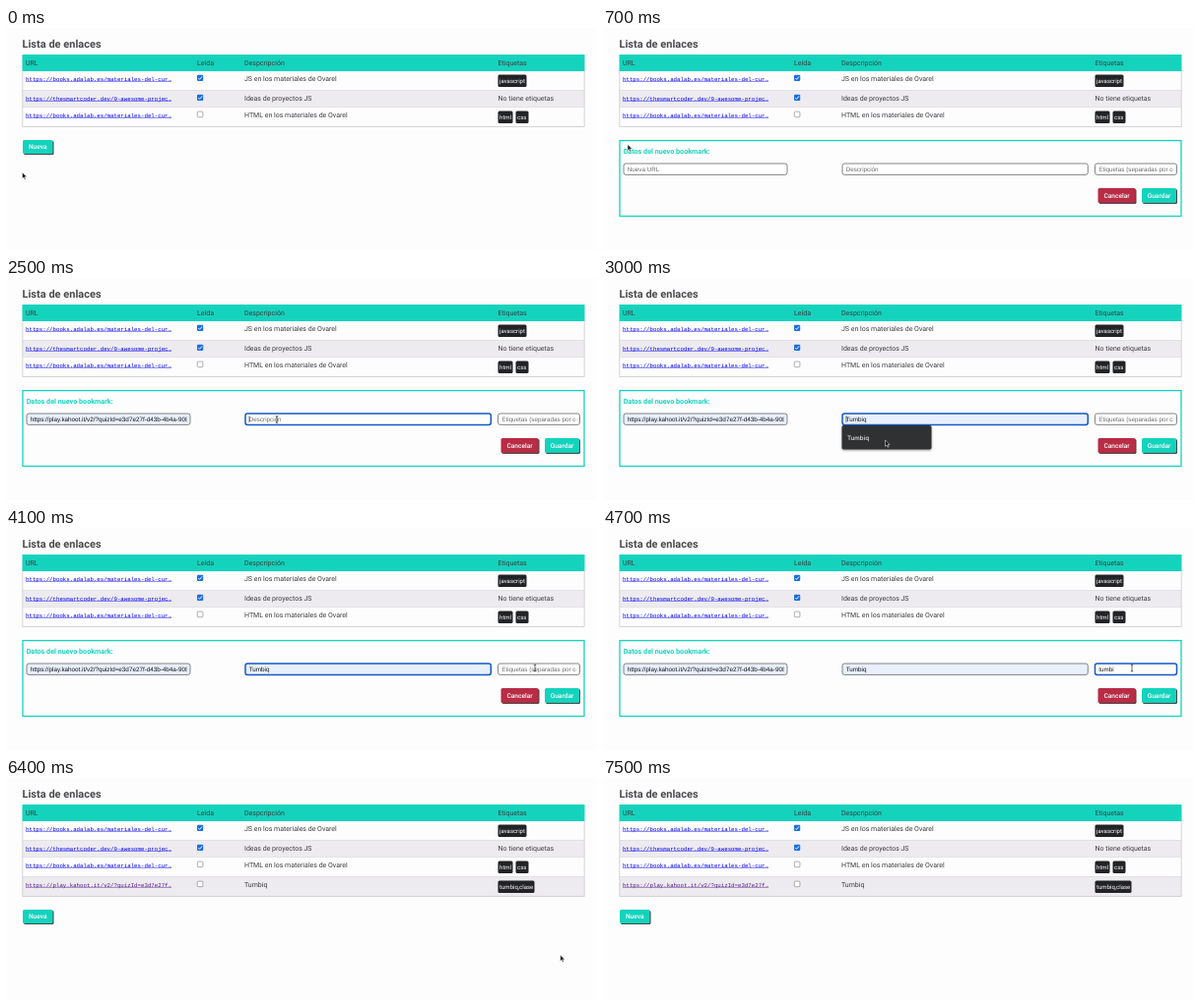
Recreate the animation shown at these times as an HTML page. Size 600 px wide and 226 px high, loop 7700 ms.

```html
<!DOCTYPE html>
<html lang="es">
<head>
<meta charset="utf-8">
<title>Lista de enlaces</title>
<style>
  html, body { margin: 0; width: 100%; height: 100%; overflow: hidden; background: #fefdfe; }
  #stage { display: block; width: 600px; height: 226px; }
  text { font: 7px Roboto, sans-serif; fill: #3c3c3f; text-rendering: geometricPrecision; white-space: pre; }
  .heading { font-size: 11px; font-weight: 700; fill: #4a4a4c; }
  .legend { font-size: 7.2px; font-weight: 700; fill: #14d3bd; }
  .link { font: 5.74px "Liberation Mono", monospace; fill: #00e; }
  .visited { fill: #551a8b; }
  .tag { font-size: 6px; fill: #fff; }
  .button { font-size: 6.6px; font-weight: 500; fill: #fff; text-anchor: middle; }
  .value { font: 6.3px "Liberation Sans", sans-serif; fill: #111; }
  .placeholder { fill: #6c6c6f; }
  .option { font: 500 6.2px Inter, sans-serif; fill: #f2f2f2; }
  .raised { filter: drop-shadow(1.2px 1.2px .7px #444); }
  .popup { filter: drop-shadow(0 1px 1px #0006); }
</style>
</head>
<body>
<svg id="stage" viewBox="0 0 600 226"></svg>
<script>
const LOOP = 7700, STEP = 100;
const TEAL = '#14d3bd', AUTOFILL = '#e8f0fe';
const COLUMNS = [20, 194, 242, 499.5];
const URL_TEXT = 'https://play.kahoot.it/v2/?quizId=e3d7e27f-d43b-4b4a-908f-7b73b2';
const TOPIC = 'Tumbiq', TAGS = 'tumbiq,clase';

// Moments of the story, in ms
const OPEN = 500, FOCUS_URL = 1400, PICK_URL = 2100, FOCUS_TOPIC = 2500,
      PICK_TOPIC = 3100, FOCUS_TAGS = 4300, TYPE = 4500, SAVE = 6300, LEAVE = 6800;

const ROWS = [
  { y: 44, h: 19.7, text: 52, url: 'https://books.adalab.es/materiales-del-cur…', read: true,
    title: 'JS en los materiales de Ovarel', tags: [['javascript', 29]] },
  { y: 63.7, h: 17, text: 72, url: 'https://thesmartcoder.dev/9-awesome-projec…', read: true,
    title: 'Ideas de proyectos JS', tags: [] },
  { y: 80.7, h: 19.8, text: 89, url: 'https://books.adalab.es/materiales-del-cur…',
    title: 'HTML en los materiales de Ovarel', tags: [['html', 15], ['css', 13]] },
  { y: 100.5, h: 20, text: 109, url: 'https://play.kahoot.it/v2/?quizId=e3d7e27f…', visited: true,
    title: TOPIC, tags: [[TAGS, 37]] }
];

// Pointer path: time, x, y
const PATH = [
  [0, 16.5, 147], [300, 30, 124], [500, 30, 122], [700, 25, 118.5], [900, 25, 118.5],
  [1400, 60, 143], [1500, 60, 143], [1800, 79.5, 160.5], [2000, 79.5, 160.5],
  [2500, 275, 144], [2700, 275, 144], [3000, 286.5, 165], [3100, 290, 143],
  [3300, 325, 143], [3500, 325, 143], [4100, 537, 142.5], [5000, 537, 142.5],
  [5400, 563, 176], [6200, 563, 176], [6800, 562, 192]
];

const rect = (x, y, w, h, fill, extra = '') =>
  `<rect x="${x}" y="${y}" width="${w}" height="${h}" fill="${fill}" ${extra}/>`;
const line = (d, color, width, extra = '') =>
  `<path d="${d}" fill="none" stroke="${color}" stroke-width="${width}" ${extra}/>`;
const label = (x, middle, content, style = '') =>
  `<text x="${x}" y="${middle + 2.4}" class="${style}">${content}</text>`;
const clipped = (x, y, w, h, content, style) =>
  `<svg x="${x}" y="${y}" width="${w}" height="${h}">${label(0, h / 2, content, style)}</svg>`;
const within = (t, from, to) => t >= from && t < to;

function checkbox(x, y, checked) {
  return checked
    ? rect(x, y, 6.2, 6.2, '#1a6fe0', 'rx="1"') + line(`M${x + 1.3} ${y + 3.2}l1.3 1.4 2.4-3`, '#fff', 0.9)
    : rect(x + 0.3, y + 0.3, 5.6, 5.6, '#fff', 'rx="1" stroke="#777" stroke-width=".6"');
}

function tagList(row) {
  if (!row.tags.length) return label(COLUMNS[3], row.text, 'No tiene etiquetas');
  let x = COLUMNS[3];
  return row.tags.map(([name, width]) => {
    const tag = rect(x, row.text - 4.5, width, 12.6, '#222326', 'rx="1.5"') +
      label(x + 1.6, row.text + 1.6, name, 'tag');
    x += width + 3;
    return tag;
  }).join('');
}

function tableRow(row, index) {
  const { y, h, text } = row, bottom = y + h;
  return rect(17, y, 570, h, index % 2 ? '#edebef' : '#fefdfe') +
    line(`M16.8 ${y}V${bottom}H587.2V${y}`, '#c9c9cc', 0.8) +
    label(20, text - 0.7, row.url, row.visited ? 'link visited' : 'link') +
    line(`M20 ${text + 2.4}h148`, row.visited ? '#551a8b' : '#00e', 0.5) +
    checkbox(COLUMNS[1], text - 4.2, row.read) +
    label(COLUMNS[2], text, row.title) + tagList(row);
}

function table(rows) {
  return label(16.5, 17.2, 'Lista de enlaces', 'heading') +
    rect(16.5, 27, 571, 17, TEAL) +
    ['URL', 'Leída', 'Despcripción', 'Etiquetas'].map((name, i) => label(COLUMNS[i], 35.3, name)).join('') +
    rows.map(tableRow).join('');
}

const button = (x, y, w, h, color, name) =>
  rect(x, y, w, h, color, 'rx="1.5" class="raised"') + label(x + w / 2, y + h / 2 - 0.2, name, 'button');

function field(x, w, placeholder, value, focused, autofilled) {
  const border = focused ? 'stroke="#1459c4" stroke-width="1.5"' : 'stroke="#666" stroke-width=".8"';
  return rect(x, 138, w, 11.4, autofilled ? AUTOFILL : '#fff', `rx="2.2" ${border}`) +
    clipped(x + 3.7, 138.5, w - 7, 10.4, value || placeholder, value ? 'value' : 'value placeholder');
}

const popup = (x, w, option) =>
  rect(x, 150, w, 24.5, '#303133', 'rx="1.8" class="popup"') + clipped(x + 5.5, 157, w - 10.5, 11, option, 'option');

const caret = x => line(`M${x} 140.5v6.5`, '#111', 0.6);

function form(t) {
  const url = t >= 1700 ? URL_TEXT : '';
  const topic = t >= 2800 ? TOPIC : '';
  const typed = TAGS.slice(0, Math.max(0, Math.round((t - TYPE) / 40)));
  const done = typed === TAGS;
  return rect(17, 114.6, 570, 77, '#fefdfe', `stroke="${TEAL}" stroke-width="1.3"`) +
    label(20.7, 126, 'Datos del nuevo bookmark:', 'legend') +
    field(21, 166, 'Nueva URL', url, within(t, FOCUS_URL, FOCUS_TOPIC), url) +
    field(243, 249.3, 'Descripción', topic, within(t, FOCUS_TOPIC, FOCUS_TAGS), topic) +
    field(499.5, 83, 'Etiquetas (separadas por comas)', typed, t >= FOCUS_TAGS, false) +
    (done ? line('M503.5 147.3h17.5m2 0h16', '#e33', 0.7, 'stroke-dasharray="1 .5"') + caret(539.5) : '') +
    (within(t, FOCUS_TOPIC, PICK_TOPIC) ? caret(247) : '') +
    button(502.5, 163, 38, 15, '#b92c46', 'Cancelar') +
    button(547, 163, 35, 15, TEAL, 'Guardar') +
    (within(t, 1600, PICK_URL) ? popup(20.5, 216.5, URL_TEXT) : '') +
    (within(t, 2700, PICK_TOPIC) ? popup(242.5, 91, TOPIC) : '');
}

function pointerAt(t) {
  const i = Math.max(1, PATH.findIndex(p => p[0] >= t));
  const [t0, x0, y0] = PATH[i - 1], [t1, x1, y1] = PATH[i];
  const k = (t - t0) / (t1 - t0), eased = k * k * (3 - 2 * k);
  return [x0 + (x1 - x0) * eased, y0 + (y1 - y0) * eased];
}

function pointer(t, formOpen) {
  if (t >= LEAVE) return '';
  const [x, y] = pointerAt(t);
  const inside = (left, right, top, bottom) => x > left && x < right && y > top && y < bottom;
  const overField = formOpen && (inside(21, 187, 138, 150) || inside(243, 492, 138, 150) || inside(499, 583, 138, 150));
  const overButton = formOpen ? inside(547, 582, 163, 178) : t < OPEN && inside(17, 47, 114, 128);
  let shape;
  if (overField) {
    shape = line('M-1.2-3.6Q0-3.6 0-2.6Q0-3.6 1.2-3.6M0-2.8V2.8M-1.2 3.6Q0 3.6 0 2.6Q0 3.6 1.2 3.6', '#222', 0.7);
  } else if (overButton) {
    shape = '<path d="M0 0q1-.5 1.2.5v2.5l3 .8q1 .4.7 1.6l-.8 3H0L-2 5.2q0-1 1-.6l.6.6z" fill="#fff" stroke="#111" stroke-width=".6"/>';
  } else {
    shape = '<path d="M0 0V6.4L1.5 5 2.5 7.3 3.6 6.8 2.6 4.6H4.6Z" fill="#111" stroke="#fff" stroke-width=".5"/>';
  }
  return `<g transform="translate(${x} ${y})">${shape}</g>`;
}

const stage = document.getElementById('stage');
let shown = -1;

function play(now) {
  const t = Math.floor(now % LOOP / STEP) * STEP;
  if (t !== shown) {
    shown = t;
    const saved = t >= SAVE, formOpen = t >= OPEN && !saved;
    stage.innerHTML = table(ROWS.slice(0, saved ? 4 : 3)) +
      (formOpen ? form(t) : button(17, saved ? 134 : 114, 30.5, 14, TEAL, 'Nueva')) +
      pointer(t, formOpen);
  }
  requestAnimationFrame(play);
}
play(performance.now());
</script>
</body>
</html>
```
